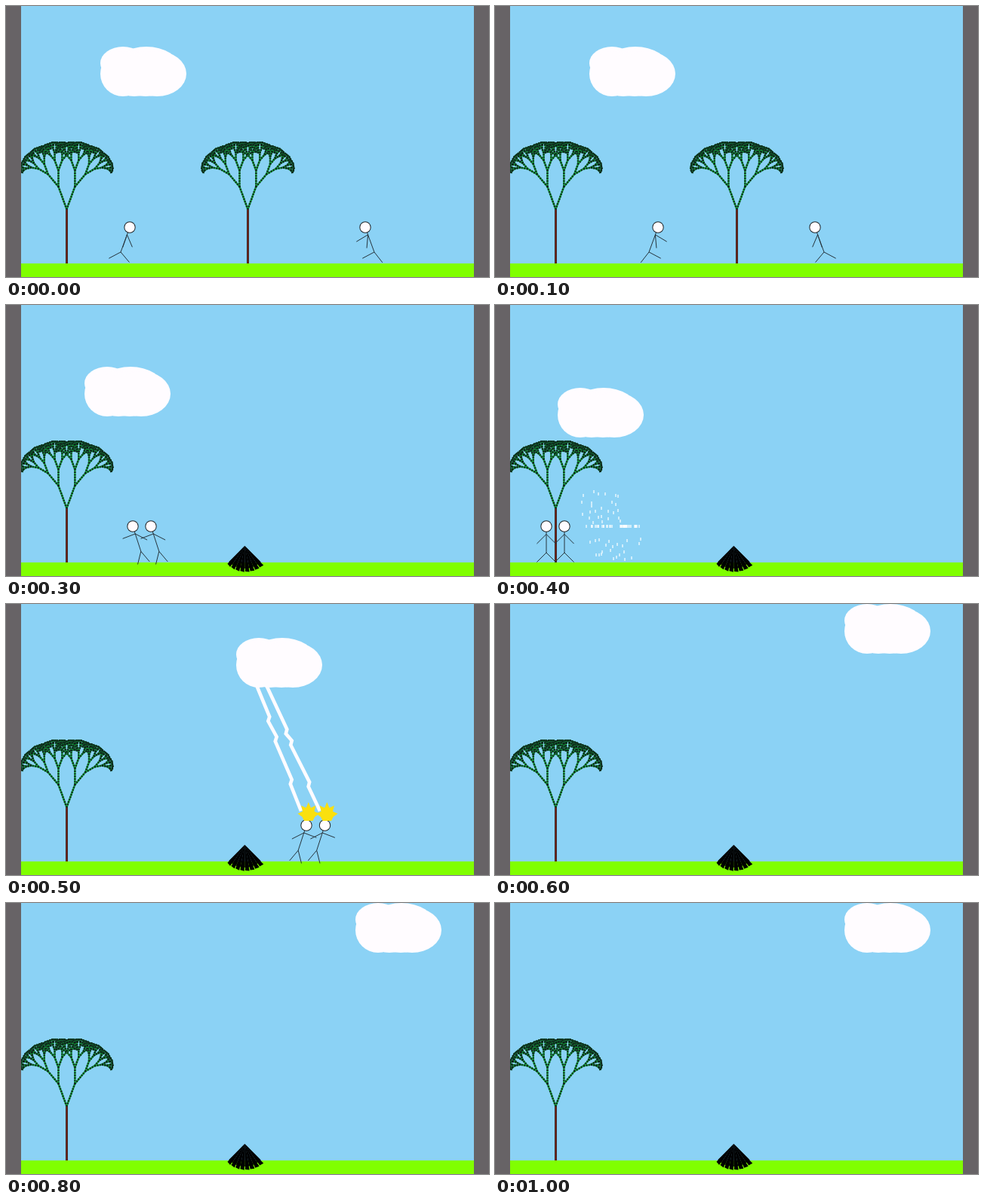
Write an HTML page with a canvas that moves like this. It is 640 by 360 pixels and loops after 1.1 s.

```html
<!DOCTYPE html>
<html lang="en">
<head>
<meta charset="utf-8">
<title>Campfire story</title>
<style>
  html, body { margin: 0; width: 100%; height: 100%; overflow: hidden; }
  canvas { display: block; width: 640px; height: 360px; }
</style>
</head>
<body>
<canvas id="stage" width="640" height="360"></canvas>
<script>
const ctx = document.getElementById('stage').getContext('2d');
const STEP = 100, STEPS = 11;
const SKY = '#8bd2f5', GRASS = '#80ff00', WALL = '#676366', WHITE = '#fffcff';

// Angles in degrees from straight down; limb pairs are [middle, half spread]
const POSES = {
  walkOpen: { lean: -20, arms: [2, 21], legs: [-11, 51] },
  walkReach: { lean: -20, arms: [32, 27], legs: [12, 50] },
  sit: { lean: 24, arms: [18, 45], legs: [52, 11] },
  stand: { lean: 0, arms: [0, 45], legs: [0, 45] },
  run: { lean: -18, arms: [3, 66], legs: [-13, 27] }
};

const someone = (pose, x, y = 294, dir = 1) => ({ pose: POSES[pose], x, y, dir });

const SCENES = [
  { cloud: [0, 0], secondTree: true, people: [someone('walkOpen', 164), someone('walkReach', 476, 294, -1)] },
  { cloud: [0, 0], secondTree: true, people: [someone('walkReach', 216), someone('walkOpen', 424, 294, -1)] },
  { cloud: [0, 0], fire: 'lit', people: [someone('sit', 268, 307), someone('sit', 372, 307, -1)] },
  { cloud: [-21, 28], fire: 'burnt', people: [someone('run', 168, 294, -1), someone('run', 192, 294, -1)] },
  { cloud: [-42, 56], fire: 'burnt', rain: true, people: [someone('stand', 68), someone('stand', 92)] },
  { cloud: [180, -9], fire: 'burnt', storm: true, people: [someone('run', 398), someone('run', 422.5)] },
  { cloud: [338, -54], fire: 'burnt', people: [] }
];

function rect(color, x, y, w, h) {
  ctx.fillStyle = color;
  ctx.fillRect(x, y, w, h);
}

function trace(points) {
  ctx.beginPath();
  points.forEach(([x, y]) => ctx.lineTo(x, y));
}

function line(points, color, width, dash = []) {
  trace(points);
  ctx.setLineDash(dash);
  ctx.strokeStyle = color;
  ctx.lineWidth = width;
  ctx.stroke();
  ctx.setLineDash([]);
}

function shape(points, color) {
  trace(points);
  ctx.fillStyle = color;
  ctx.fill();
}

function ellipse(x, y, rx, ry, color) {
  ctx.beginPath();
  ctx.ellipse(x, y, rx, ry, 0, 0, 2 * Math.PI);
  ctx.fillStyle = color;
  ctx.fill();
}

// Point at a distance from [x, y], angle measured from straight down
function polar([x, y], dist, deg) {
  const a = deg * Math.PI / 180;
  return [x + dist * Math.sin(a), y + dist * Math.cos(a)];
}

function seeded(seed) {
  return () => (seed = (seed * 16807) % 2147483647) / 2147483647;
}

function branch(from, len, angle) {
  if (len < 1.9) return;
  const to = polar(from, -len, -angle);
  line([from, to], '#14983a', 2.4);
  line([from, to], '#101c1c', 2.5, len < 7 ? [2, 1.3] : [1.4, 2]);
  for (const turn of [-20, 20]) branch(to, len * 0.67, angle + turn);
}

function tree(x) {
  rect('#3a2424', x - 1, 270, 3, 72);
  rect('#84281a', x, 270, 1, 72);
  for (const angle of [-20, 20]) branch([x + 0.4, 270], 32, angle);
}

function cloud([dx, dy]) {
  ellipse(155 + dx, 76 + dy, 30, 22, WHITE);
  ellipse(186 + dx, 82 + dy, 44, 28, WHITE);
  for (let i = 0; i < 4; i++) ellipse(155 + 15 * i + dx, 90 + dy, 30 + 3 * i, 30, WHITE);
}

function flame(x, y, sx = 1, sy = 1) {
  const points = [[-12, 0]];
  for (let i = -5; i <= 5; i++) points.push(polar([0, -14], i % 2 ? -18 : -30, -21 * i));
  points.push([12, 0]);
  shape(points.map(([px, py]) => [x + px * sx, y + py * sy]), '#fae00e');
}

function logs(lit) {
  const tip = [316.4, 320];
  const count = 8, span = 90 / count;
  for (let i = 0; i < count; i++) {
    const a = -45 + i * span;
    const log = [tip, polar(tip, 33 + i / 4, a + 1), polar(tip, 34 + i / 4, a + span - 1)];
    shape(log, lit ? '#81391d' : '#000');
    if (lit) line([...log, tip], '#24100a', 1.2);
    else shape([tip, polar(tip, 30, a), polar(tip, 30, a + span)], '#000');
  }
}

function bolt(x0, x1, jogs) {
  const top = 108, drop = 167;
  const at = (f, shift) => [x0 + (x1 - x0) * f + shift, top + drop * f];
  const kinks = jogs.flatMap(f => [at(f, 2.5), at(f + 0.035, -1.5)]);
  line([at(0, 0), ...kinks, at(1, 0)], WHITE, 4.6);
}

function person({ pose, x, y, dir }) {
  const lean = pose.lean * dir;
  const shoulder = polar([x, y], 10.5, lean);
  const hip = polar([x, y], 35, lean);
  const limbs = (joint, [mid, half]) => {
    const ends = [mid - half, mid + half].map(a => polar(joint, 17.8, a * dir));
    line([ends[0], joint, ends[1]], '#26343c', 1);
  };
  line([[x, y], hip], '#26343c', 1);
  limbs(shoulder, pose.arms);
  limbs(hip, pose.legs);
  ellipse(x, y, 7.7, 7.7, '#202428');
  ellipse(x, y, 6.7, 6.7, WHITE);
}

function rain() {
  const rnd = seeded(4217);
  const shower = (count, x, y, w, h) => {
    while (count--) {
      rect('rgba(255,255,255,.6)', Math.round(x + rnd() * w), Math.round(y + rnd() * h), 2, 4);
    }
  };
  shower(26, 113, 243, 60, 48);
  shower(40, 119, 292, 72, 0);
  shower(22, 121, 308, 72, 28);
}

function draw(scene) {
  rect(SKY, 0, 0, 640, 360);
  rect(GRASS, 0, 342, 640, 18);
  if (scene.storm) {
    bolt(332, 391, [0.25, 0.41, 0.75]);
    bolt(345, 416, [0.35, 0.44, 0.77]);
  }
  cloud(scene.cloud);
  tree(80);
  if (scene.secondTree) tree(320);
  if (scene.rain) rain();
  if (scene.fire) logs(scene.fire === 'lit');
  if (scene.fire === 'lit') flame(320, 330);
  for (const p of scene.people) {
    person(p);
    if (scene.storm) flame(p.x + 2.8, p.y - 6, 0.48, 0.56);
  }
  rect(WALL, 0, 0, 20, 360);
  rect(WALL, 620, 0, 20, 360);
}

const start = performance.now();
let shown = -1;

function tick() {
  const step = Math.floor((performance.now() - start) / STEP) % STEPS;
  const index = Math.min(step, SCENES.length - 1);
  if (index !== shown) draw(SCENES[shown = index]);
  requestAnimationFrame(tick);
}
tick();
</script>
</body>
</html>
```
